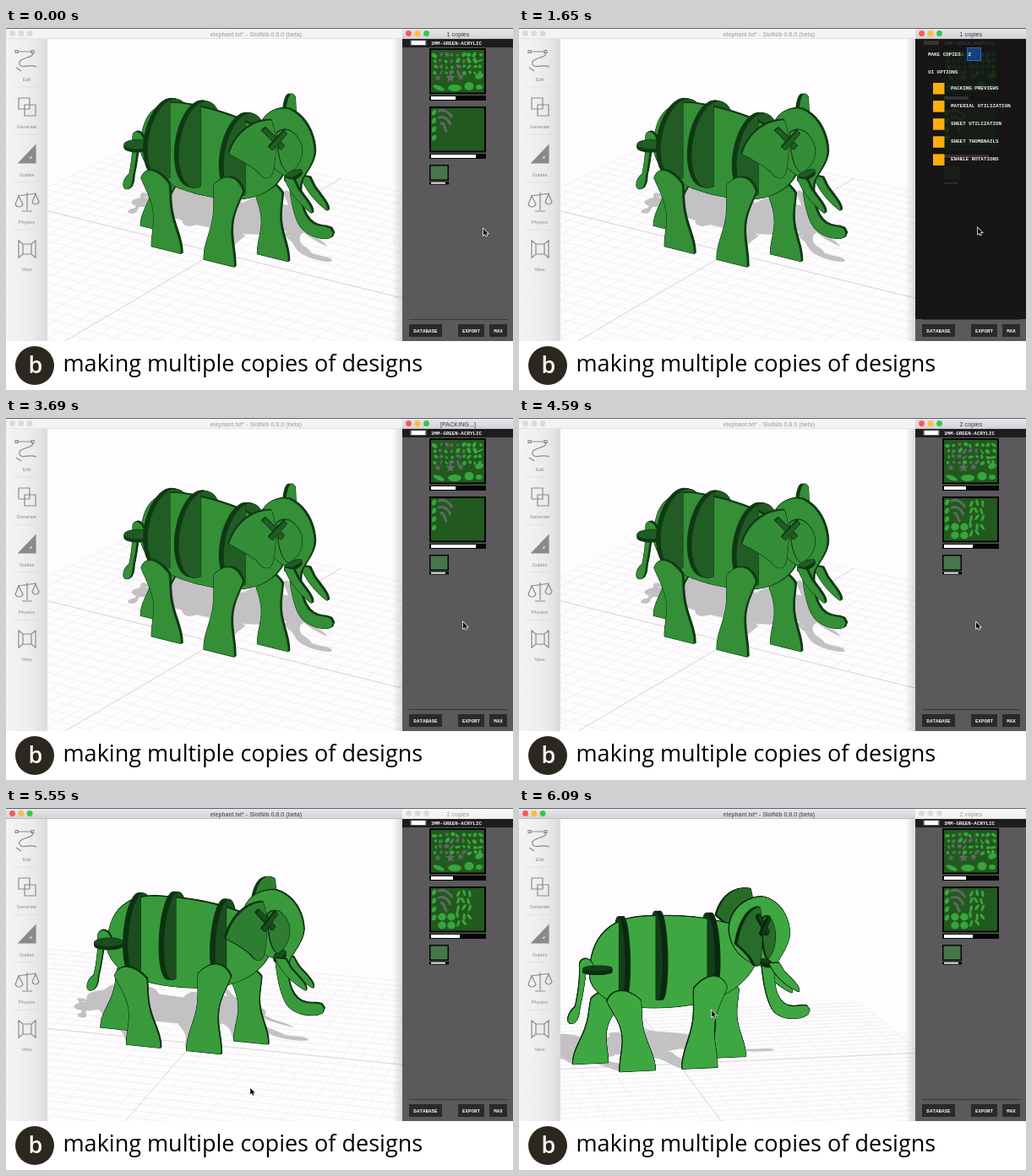
These frames come from a looping animation (600x429 px, 6120 ms). An HTML page with a canvas:

```html
<!DOCTYPE html>
<html lang="en">
<head>
<meta charset="utf-8">
<style>
html, body { margin: 0; width: 100%; height: 100%; overflow: hidden; background: #fff }
canvas { display: block }
</style>
</head>
<body>
<canvas id="stage" width="600" height="429"></canvas>
<script>
const LOOP = 6120;
const ctx = document.getElementById('stage').getContext('2d');
const SANS = '"Liberation Sans", Arial, sans-serif';
const MONO = 'bold 5.9px "Liberation Mono", monospace';

// ---------- helpers ----------
const lerp = (a, b, f) => a.map((v, i) => v + (b[i] - v) * f);

// keys: rows of [time, ...values]
function at(keys, t) {
  const i = keys.findIndex(k => k[0] > t);
  if (i < 0) return keys.at(-1).slice(1);
  const [a, b] = [keys[i - 1], keys[i]];
  return lerp(a, b, (t - a[0]) / (b[0] - a[0])).slice(1);
}
function box(color, x, y, w, h) {
  ctx.fillStyle = color;
  ctx.fillRect(x, y, w, h);
}
function dot(color, x, y, rx, ry = rx, turn = 0) {
  ctx.fillStyle = color;
  ctx.beginPath();
  ctx.ellipse(x, y, rx, ry, turn, 0, 7);
  ctx.fill();
}
function text(s, x, y, font, color, align = 'left') {
  ctx.font = font;
  ctx.fillStyle = color;
  ctx.textAlign = align;
  ctx.fillText(s, x, y);
}
function stroke(d, color, width = 1) {
  ctx.strokeStyle = color;
  ctx.lineWidth = width;
  ctx.stroke(new Path2D(d));
}
function fade(x, w, ...colors) {
  const g = ctx.createLinearGradient(x, 0, x + w, 0);
  colors.forEach((c, i) => g.addColorStop(i / (colors.length - 1), c));
  return g;
}
function random(seed) {
  return () => (seed = seed * 16807 % 2147483647) / 2147483647;
}

// ---------- camera: yaw in degrees, sine of pitch, screen position of the ground centre ----------
const ORBIT = [[0, 33, .35, 233, 262], [5280, 33, .35, 233, 262], [5550, 16.5, .31, 204, 277],
  [5760, -3, .23, 176, 298], [6090, -11, .19, 171, 304]];
const view = {};

function aim(t) {
  const [yaw, pitch, x, y] = at(ORBIT, t);
  const a = yaw * Math.PI / 180;
  Object.assign(view, { sin: Math.sin(a), cos: Math.cos(a), pitch, rise: Math.sqrt(1 - pitch * pitch), x, y });
  view.side = Math.min(1, (33 - yaw) / 36);
}
function project([x, y, z]) {
  const depth = x * view.sin + z * view.cos;
  const k = 1 / (1 - depth / 2500);
  const sx = view.x + x * view.cos - z * view.sin;
  const sy = view.y - y * view.rise + depth * view.pitch;
  return [234 + (sx - 234) * k, 190 + (sy - 190) * k];
}

// ---------- elephant: flat plates slotted together in space ----------
const TONES = {
  light: [[52, 143, 55], [63, 167, 65]],
  ear: [[52, 142, 56], [40, 108, 43]],
  dark: [[32, 92, 36], [18, 62, 25]],
  edge: [[16, 58, 20], [10, 42, 15]]
};
const tone = name => `rgb(${lerp(...TONES[name], view.side).map(Math.round)})`;

function outline(d, count = 70) {
  const path = document.createElementNS('http://www.w3.org/2000/svg', 'path');
  path.setAttribute('d', d);
  const step = path.getTotalLength() / count;
  return Array.from({ length: count }, (_, i) => path.getPointAtLength(i * step)).map(p => [p.x, p.y]);
}
// Side-view drawing coordinates to space; w runs through the thickness.
const height = (v, z = 0) => (298 + .23 * z - v) / .974;
const upright = z => (u, v, w) => [u - 176, height(v, z), z + w];

const plate = (points, map, color = 'light', thick = 2) => ({ points, map, color, thick });

function leg(z, hip, foot, top) {
  const left = [], right = [], bottom = 298 + .23 * z;
  for (let i = 0; i <= 24; i++) {
    const s = (i / 24) ** 1.5;
    const mid = hip + (foot - hip) * Math.sin(s * Math.PI / 2);
    const half = (17 + 4 * Math.cos(s * 2 * Math.PI)) * Math.min(1, Math.sqrt(s * 8));
    const y = top + (bottom - top) * s;
    left.unshift([mid - half, y]);
    right.push([mid + half, y]);
  }
  return plate([...left, ...right], upright(z));
}
function halfRib(side, x, top, bottom) {
  const points = Array.from({ length: 25 }, (_, i) => {
    const a = i / 24 * Math.PI;
    return [side * 47 * Math.sin(a), (top + bottom - (bottom - top) * Math.cos(a)) / 2];
  });
  return { ...plate(points, (u, v, w) => [x - 176 + w, height(v), u], 'dark', 3), cross: true };
}
const RIBS = [[126, 123, 219], [170, 118, 221], [232, 122, 219]];
const ribs = side => RIBS.map(r => halfRib(side, ...r));

// Ears swing out and back from the head.
const ear = (side, lift, push = 0) => (u, v, w) =>
  [111 + .69 * u + .72 * (w + push), height(v) + lift, side * (24 - .72 * u + .69 * (w + push))];
const EAR = outline('M-2 112C-25 110 -45 125 -52 148C-40 155 -25 165 -18 172C-10 184 -2 182 0 172C4 150 4 130 -2 112Z');
const LOBE = outline('M5 128C15 120 28 128 34 145C37 160 30 172 18 176C10 170 6 155 5 128Z');
const TUSK = outline('M300 184C306 198 318 210 336 219C338 212 326 203 318 194L312 184Z');

const disc = Array.from({ length: 30 }, (_, i) => [17 * Math.cos(i * Math.PI / 15), 17 * Math.sin(i * Math.PI / 15)]);
const flat = (x, y, z, long = 1) => (u, v, w) => [x + u / long, y + w, z + v];

const elephant = [
  leg(-24, 118, 92, 205),
  leg(-24, 250, 259, 200),
  plate(TUSK, upright(-18)),
  plate(EAR, ear(-1, 14), 'ear'),
  ...ribs(-1),
  plate(outline('M88 190C88 152 105 125 150 123C195 122 225 126 255 135L290 175C283 200 255 222 215 228C170 234 125 230 105 216C95 208 88 200 88 190Z'), upright(0)),
  plate(outline('M255 140C256 118 275 104 295 104C316 108 329 128 329 150C327 165 315 178 311 188C308 205 312 226 324 233C334 238 342 234 349 235C356 238 354 246 347 248C334 252 318 250 309 240C300 226 297 205 295 186C275 182 255 165 255 140Z'), upright(0)),
  plate(disc, flat(124, height(183), 0, 3), 'dark'),
  plate(TUSK, upright(18)),
  plate(outline('M92 178C88 168 78 168 76 176C77 195 74 212 71 226C64 230 59 243 65 245C73 246 76 235 76 227C80 212 82 195 84 180L92 186Z'), upright(0)),
  plate(disc, flat(-81, height(181), 17), 'dark'),
  ...ribs(1),
  leg(24, 121, 141, 210),
  leg(24, 231, 215, 197),
  plate(LOBE, ear(1, 0), 'ear', 1),
  plate(EAR, ear(1, 0), 'ear'),
  plate(outline('M-14 122L-10 119L12 142L8 146Z'), ear(1, 0, 5), 'dark', 1.5),
  plate(outline('M-6 142L12 124L15 128L-2 146Z'), ear(1, 0, 5), 'dark', 1.5)
];

function trace(points) {
  ctx.beginPath();
  points.forEach(p => ctx.lineTo(...project(p)));
  ctx.closePath();
}
function drawPlate({ points, map, color, thick, cross }) {
  const facing = cross ? Math.sign(view.sin) || 1 : 1;
  ctx.fillStyle = ctx.strokeStyle = tone('edge');
  ctx.lineWidth = 1.1;
  for (let i = -2; i <= 2; i++) {
    trace(points.map(([u, v]) => map(u, v, facing * thick * i / 2)));
    ctx.fill();
    ctx.stroke();
  }
  ctx.fillStyle = tone(color);
  ctx.fill();
}
function drawShadow({ points, map }) {
  ctx.fillStyle = '#c4c1c5';
  trace(points.map(([u, v]) => {
    const [x, y, z] = map(u, v, 0);
    return [x - .54 * y, 0, z - .9 * y];
  }));
  ctx.fill();
}

// ---------- main window ----------
function drawGrid() {
  const line = (a, b, color) => {
    ctx.strokeStyle = color;
    ctx.lineWidth = .8;
    trace([a, b]);
    ctx.stroke();
  };
  const pair = (k, color) => {
    line([18 + k, 0, -300], [18 + k, 0, 300], color);
    line([-282, 0, k], [318, 0, k], color);
  };
  for (let k = -300; k <= 300; k += 20) pair(k, '#f4f2f5');
  pair(0, '#dddbdf');
}
function titleBar(x, w, gap, title, center, active) {
  const shade = ctx.createLinearGradient(0, 0, 0, 13);
  shade.addColorStop(0, active ? '#ebe9eb' : '#f7f6f7');
  shade.addColorStop(1, active ? '#d3d1d3' : '#f3f2f3');
  box(shade, x, 0, w, 13);
  box('#2c4166', x, 0, w, .8);
  box(active ? '#b9b7b9' : '#dddcdd', x, 12.3, w, .7);
  const lights = active ? ['#fc5753', '#fdbc40', '#34c84a'] : ['#dcdbdc', '#dcdbdc', '#dcdbdc'];
  lights.forEach((c, i) => dot(c, x + 7.5 + i * gap, 6.5, 3.4));
  text(title, center, 9.5, '7.2px ' + SANS, active ? '#3c3a3c' : '#9a999a', 'center');
}
const ICONS = [
  ['Edit', 'M13 28H30M30 28C38 36 13 34 16 43C19 49 28 42 36 46M12 47L18 51M11 26.5h3v3h-3zM30 26.5h3v3h-3z'],
  ['Generate', 'M22 96H15V83H28V91M22 91H35V104H22ZM22 91V96H28V91'],
  ['Guides', 'M15 160L35 139V160ZM26 155L31 150V155Z'],
  ['Physics', 'M25 195V216M19 217H31M14 199L36 196M11 209L15 199L20 209C18 213 13 213 11 209ZM31 206L35 197L39 206C37 210 33 210 31 206Z'],
  ['View', 'M15 251V273M35 251V273M15 252L20 256H30L35 252M15 272L20 268H30L35 272M20 256V268M30 256V268']
];
function drawSidebar() {
  box(fade(0, 49, '#f5f4f5', '#f1f0f1', '#ebeaeb', '#dcdbdc'), 0, 13, 49, 358);
  ICONS.forEach(([label, d], i) => {
    stroke(d, '#8b8a8b', 1.2);
    if (label === 'Guides') {
      ctx.fillStyle = '#8b8a8b';
      ctx.fill(new Path2D(d), 'evenodd');
    }
    text(label, 24.5, 63 + i * 56.3, '5.6px ' + SANS, '#8a898a', 'center');
    if (i < 4) box('#dfdedf', 9, 69.5 + i * 56.4, 31, .8);
  });
}

// ---------- packing panel ----------
const BRIGHT = '#38a53d', CUT = '#5f6a5f', SHEET = '#22591f';

function star(x, y, r) {
  ctx.fillStyle = CUT;
  ctx.beginPath();
  for (let i = 0; i < 10; i++) {
    const a = i * Math.PI / 5, q = i % 2 ? r * .45 : r;
    ctx.lineTo(x + q * Math.sin(a), y - q * Math.cos(a));
  }
  ctx.fill();
}
function sheet(y, h, used) {
  box('#050505', 501, y, 67, h);
  box(SHEET, 503, y + 2, 63, h - 4);
  box('#050505', 501, y + h + 1.5, 67, 6);
  box('#fff', 503, y + h + 2.5, used, 4);
}
function drawSheets(done) {
  sheet(24, 54.5, done ? 26 : 29);
  const rnd = random(done ? 91 : 37);
  for (let i = 0; i < 36; i++) {
    const x = 507 + i % 9 * 6.7, y = 31 + Math.floor(i / 9) * 7;
    const color = x > 508 && x < 545 && rnd() < .5 ? CUT : BRIGHT;
    dot(color, x + rnd() * 2, y + rnd() * 2, 1 + rnd() * 1.4, 1.6 + rnd() * 2, rnd() * 3);
  }
  star(526, 59, 6);
  star(538, 58, 4.5);
  star(511, 59, 4);
  dot(BRIGHT, 531, 71, 8, 4);
  dot(BRIGHT, 548, 69, 5.5, 5);
  dot(BRIGHT, 560, 57, 5, 3.5, -.3);
  dot(BRIGHT, 512, 71, 7, 2.6, .4);
  dot(BRIGHT, 560, 70, 4, 3);

  sheet(93, 54.5, done ? 34 : 53);
  for (let y = 100; y < 132; y += 10) dot(BRIGHT, 506.5, y, 2.4, 3.6, .5);
  stroke('M511 99C517 95 524 99 528 106M511 107C517 103 524 108 526 115M514 113C520 111 518 120 522 123', CUT, 3);
  if (done) {
    for (let i = 0; i < 4; i++) dot(BRIGHT, 516 + i % 2 * 11, 129 + (i >> 1) * 10, 4.8, 4.4);
    for (let i = 0; i < 14; i++)
      dot(BRIGHT, 534 + i % 3 * 6.5 + rnd() * 2, 99 + Math.floor(i / 3) * 9 + rnd() * 3, 1.6, 4, rnd() * 1.4 - .7);
  }

  box('#050505', 501, 162, 23, 19);
  box('#47764b', 502.5, 163.5, 20, 16);
  box('#050505', 501, 182, 23, 3.5);
  box('#fff', 503, 182.8, 17, 1.8);
}
function drawOptions(t) {
  box('#171516', 469, 13, 131, 332);
  ctx.save();
  ctx.globalAlpha *= .13;
  drawSheets(false);
  box('#fff', 479, 15, 18, 5);
  text('3MM-GREEN-ACRYLIC', 503, 20, MONO, '#fff');
  ctx.restore();
  text('MAKE COPIES:', 484, 33, MONO, '#eee');
  box('#2a68b8', 530, 23, 17, 16);
  box('#14407f', 531, 24, 15, 14);
  text(t < 1290 ? '1' : '2', 531.5, 33, MONO, '#fff');
  text('UI OPTIONS', 484, 54, MONO, '#eee');
  ['PACKING PREVIEWS', 'MATERIAL UTILIZATION', 'SHEET UTILIZATION', 'SHEET THUMBNAILS', 'ENABLE ROTATIONS'].forEach((label, i) => {
    box('#fdae0d', 490, 65 + i * 21.1, 13.5, 13.5);
    text(label, 511, 73 + i * 21.1, MONO, '#eee');
  });
}
function drawPanel(t, active) {
  const done = t >= 4560;
  box(fade(457, 12, 'rgba(0,0,0,0)', 'rgba(0,0,0,.14)'), 457, 13, 12, 358);
  box('#5b595b', 469, 13, 131, 358);
  box('#1e1c1e', 469, 13, 131, 10);
  box('#888', 478.5, 14.5, 19, 6);
  box('#fff', 480, 15, 16, 5);
  text('3MM-GREEN-ACRYLIC', 503, 20, MONO, '#f4f4f4');
  drawSheets(done);
  box('#383638', 477, 345, 116, 1);
  for (const [label, x, w] of [['DATABASE', 477, 39], ['EXPORT', 535, 31], ['MAX', 572, 21]]) {
    box('#2b292b', x, 351, w, 15);
    text(label, x + w / 2, 360.5, MONO, '#f0f0f0', 'center');
  }
  const [shown] = at([[0, 0], [420, 0], [630, 1], [1680, 1], [1920, 0]], t);
  if (shown > 0) {
    ctx.save();
    ctx.globalAlpha = shown;
    drawOptions(t);
    ctx.restore();
  }
  const title = done ? '2 copies' : t >= 2160 ? '[PACKING...]' : '1 copies';
  titleBar(469, 131, 10.5, title, 535, active);
}

// ---------- pointer and scene ----------
const POINTER = [[0, 565, 238], [360, 565, 238], [840, 539, 31], [1290, 539, 31], [1590, 543, 236],
  [2160, 541, 242], [5040, 541, 242], [5280, 225, 318], [5550, 289, 332], [5760, 329, 322], [6090, 228, 240]];

function drawPointer(t) {
  const [x, y] = at(POINTER, t);
  ctx.save();
  ctx.translate(x, y);
  const arrow = 'M0 0V7.6L1.8 6.1L3 8.7L4.2 8.2L3.1 5.6H5.5Z';
  stroke(arrow, '#fff', 1.4);
  ctx.fillStyle = '#000';
  ctx.fill(new Path2D(arrow));
  ctx.restore();
}
function drawScene(t) {
  const mainActive = t >= 5280;
  aim(t);
  box('#fff', 0, 0, 600, 429);
  ctx.save();
  ctx.beginPath();
  ctx.rect(48, 13, 421, 358);
  ctx.clip();
  ctx.lineJoin = 'round';
  box('#fefcfe', 48, 13, 421, 358);
  drawGrid();
  elephant.forEach(drawShadow);
  elephant.forEach(drawPlate);
  ctx.restore();
  drawSidebar();
  titleBar(0, 469, 10.3, 'elephant.txt* - SlotNib 0.8.0 (beta)', 296, mainActive);
  drawPanel(t, !mainActive);
  drawPointer(t);
  dot('#2c271f', 34, 400, 23);
  text('b', 35, 408.5, '600 27px "Open Sans", sans-serif', '#fff', 'center');
  text('making multiple copies of designs', 67.5, 407, '27px "Open Sans", sans-serif', '#000');
}
function tick() {
  drawScene(performance.now() % LOOP);
  requestAnimationFrame(tick);
}
tick();
</script>
</body>
</html>
```
